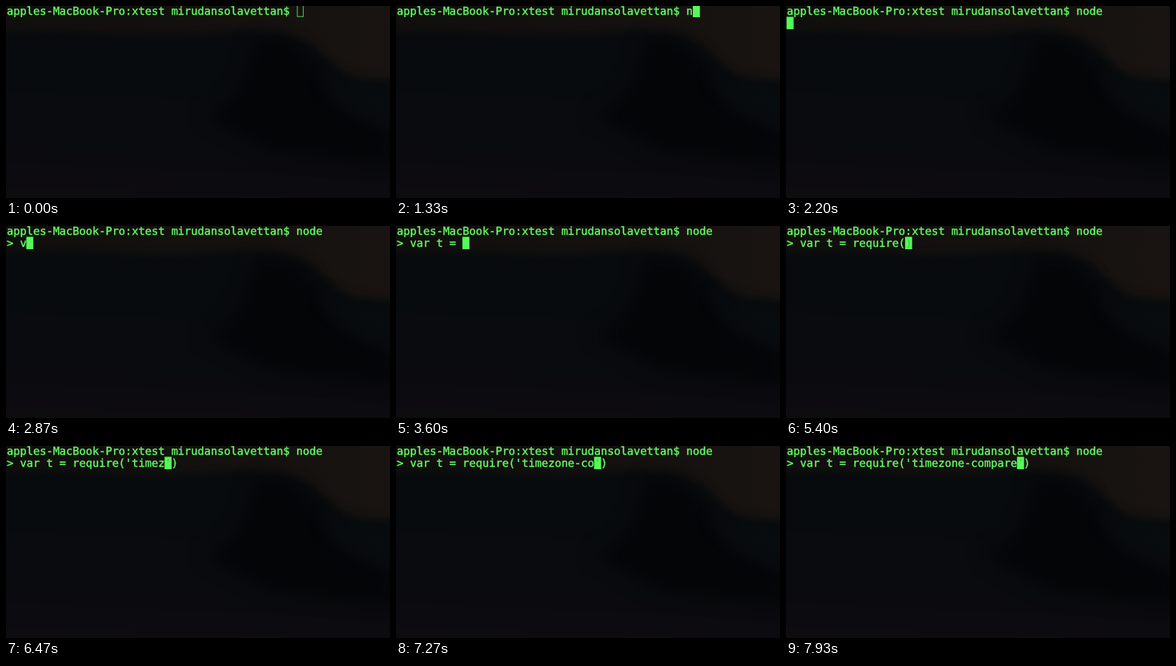
An HTML page for the animation above (8000 ms loop, 480 by 240 pixels).

```html
<!DOCTYPE html>
<html lang="en">
<head>
<meta charset="utf-8">
<title>Terminal session</title>
<style>
  html, body { margin: 0; width: 100%; height: 100%; overflow: hidden; background: #08090b; }
  svg { display: block; width: 100vw; height: 100vh; }
  filter { color-interpolation-filters: sRGB; }
  text {
    font: 13.67px "DejaVu Sans Mono", "Liberation Mono", monospace;
    white-space: pre;
    text-rendering: geometricPrecision;
    font-variant-ligatures: none;
    fill: #66ff66;
    stroke: #66ff66;
    stroke-width: .35px;
  }
  #under { fill: #3fc647; stroke: none; }
</style>
</head>
<body>
<svg viewBox="0 0 480 240" preserveAspectRatio="none">
  <defs>
    <linearGradient id="sky">
      <stop offset="0" stop-color="#110f0e"/>
      <stop offset=".6" stop-color="#14110f"/>
      <stop offset="1" stop-color="#191411"/>
    </linearGradient>
    <linearGradient id="sea" x1=".1" y1="0" x2="0" y2="1">
      <stop offset="0" stop-color="#080b0d"/>
      <stop offset=".5" stop-color="#090b0e"/>
      <stop offset="1" stop-color="#0f0c10"/>
    </linearGradient>
    <filter id="soft" x="-20%" y="-20%" width="140%" height="140%"><feGaussianBlur stdDeviation="4"/></filter>
    <filter id="haze" x="-50%" y="-80%" width="200%" height="260%"><feGaussianBlur stdDeviation="11"/></filter>
  </defs>
  <rect width="480" height="240" fill="url(#sky)"/>
  <path d="M-20 33 Q60 29 120 33 T250 34 Q300 28 340 33 Q375 38 395 60 Q415 84 440 90 L500 94 V260 H-20Z" fill="url(#sea)" filter="url(#soft)"/>
  <path d="M310 42 Q350 36 375 60 Q390 95 415 130 L490 165 V200 Q400 190 330 180 L245 135 Q300 125 310 42Z" fill="#040507" filter="url(#haze)"/>
  <path d="M395 85 Q430 105 490 108 V145 Q430 125 395 85Z" fill="#080d0f" filter="url(#haze)"/>
  <text id="line1" x="1.1" y="11"></text>
  <text id="line2" x="1.1" y="26"></text>
  <rect id="cursor"/>
  <text id="under"></text>
</svg>
<script>
const LOOP = 8000, LEFT_EDGE = 1.1, PITCH = 8.23, LINE = 15;
const PROMPT = "apples-MacBook-Pro:xtest mirudansolavettan$ ";
const FOCUS = 70, ENTER = 2150, READY = 2400;
const BACK = "<"; // cursor moves one column left

// Keystrokes as [keys, start, ms between keys]
const shellKeys = [["node", 1270, 135]];
const nodeKeys = [
  ["va", 2800, 130], ["r t = ", 3000, 105],
  ["require", 3850, 115],
  ["()" + BACK, 4800, 135],
  ["''" + BACK, 5560, 130], ["timez", 5930, 117],
  ["one-compare", 6600, 127]
];

const el = id => document.getElementById(id);
const line1 = el("line1"), line2 = el("line2"), cursor = el("cursor"), under = el("under");

function set(node, attrs) {
  for (const k in attrs) node.setAttribute(k, attrs[k]);
}

// Replays all keys pressed up to time t
function typed(runs, t) {
  let text = "", pos = 0;
  for (const [keys, start, gap] of runs) {
    [...keys].forEach((key, i) => {
      if (t < start + i * gap) return;
      if (key === BACK) { pos--; return; }
      text = text.slice(0, pos) + key + text.slice(pos);
      pos++;
    });
  }
  return { text, pos };
}

function drawCursor(row, col, char, filled) {
  const x = LEFT_EDGE + col * PITCH, y = row * LINE - 1.5;
  if (filled) {
    set(cursor, { x: x - 0.4, y, width: 8.8, height: 15.5, fill: "#54fb58", stroke: "none" });
  } else {
    set(cursor, { x: x + 0.9, y: y + 1, width: 7.5, height: 13.7, fill: "none", stroke: "#48d24e", "stroke-width": 1 });
  }
  under.textContent = char;
  set(under, { x, y: 11 + row * LINE });
}

function render(t) {
  const shell = typed(shellKeys, t);
  line1.textContent = PROMPT + shell.text;
  if (t < ENTER) {
    line2.textContent = "";
    drawCursor(0, PROMPT.length + shell.pos, "", t >= FOCUS);
    return;
  }
  const repl = typed(nodeKeys, t);
  const prefix = t < READY ? "" : "> ";
  line2.textContent = prefix + repl.text;
  drawCursor(1, prefix.length + repl.pos, repl.text[repl.pos] || "", true);
}

const begin = performance.now();
function tick() {
  render((performance.now() - begin) % LOOP);
  requestAnimationFrame(tick);
}
tick();
</script>
</body>
</html>
```
